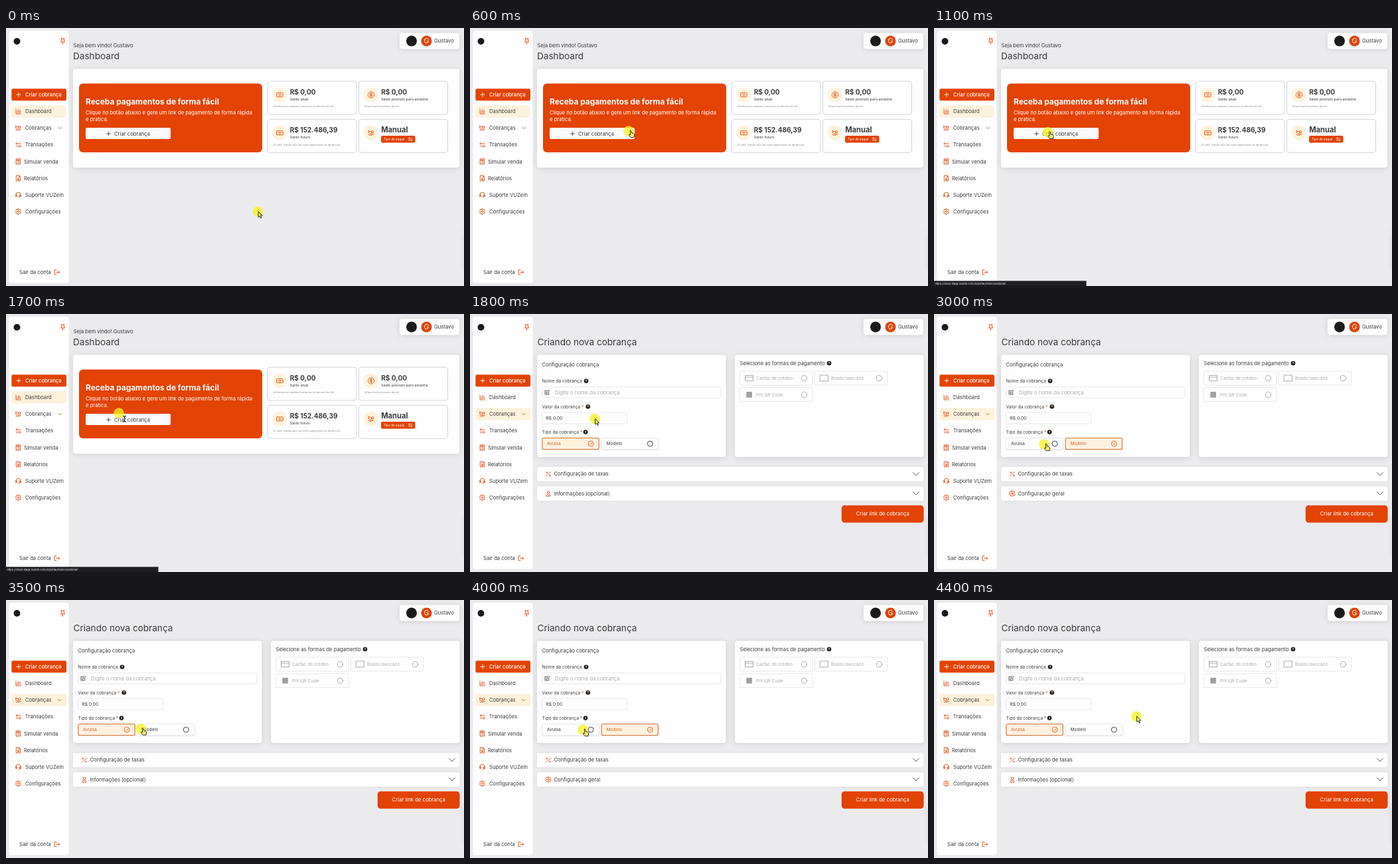
Animation, 690 px wide and 388 px high, one loop 4900 ms. Source, as an HTML page:

```html
<!DOCTYPE html>
<html lang="pt-BR">
<head>
<meta charset="utf-8">
<title>Dashboard</title>
<style>
  html, body { margin: 0; width: 100%; height: 100%; overflow: hidden; background: #ebebed; }
  svg { display: block; width: 100%; height: 100%; font: 7.7px Inter, "Open Sans", sans-serif; }
  text { fill: #3c3c3e; }
  .icon { fill: none; stroke: #e04a10; stroke-width: .9; stroke-linecap: round; stroke-linejoin: round; }
  .dark { stroke: #444; }
  .light { stroke: #fff; }
  .grey { stroke: #a0a0a0; }
  .panel { fill: #fefefe; filter: drop-shadow(0 1px 4px #0000001c); }
  .row { fill: #fefefe; filter: drop-shadow(0 0 2px #0000000d); }
  .orange { fill: #e34304; }
  .cream { fill: #fdf2da; }
  .white { fill: #fff; }
  .muted { fill: #adadad; }
  .title { font-size: 13.6px; }
  .label { font-size: 6.7px; }
  .small { font-size: 5.35px; }
  .tiny { font-size: 3.65px; fill: #888; }
  .bold { font-weight: 700; font-size: 10.1px; }
  .box { fill: #fefefe; stroke: #cfd0d8; stroke-width: .9; }
  .field { fill: #fefefe; stroke: #e2e2e4; stroke-width: .8; }
  .option rect { fill: #fefefe; stroke: #e6e6e8; stroke-width: .7; filter: drop-shadow(0 1px 1px #0000001c); }
  .option circle { fill: none; stroke: #333; stroke-width: .9; }
  .option path { display: none; }
  .option.on rect { fill: #fdf2de; stroke: #d2703a; stroke-width: 1.1; filter: none; }
  .option.on text { fill: #d9642c; }
  .option.on circle, .option.on path { stroke: #d9642c; }
  .option.on path { display: inline; }
  .cursor { fill: #f5f07a; stroke: #222; stroke-width: .9; stroke-linejoin: round; }
</style>
</head>
<body>
<svg viewBox="0 0 690 388" preserveAspectRatio="none">
  <defs>
    <path id="plus" d="M-3 0H3M0-3V3"/>
    <path id="chart" d="M-3.5-3.5V3.5H3.7M-1.4 1.8V-.8M.7 1.8V-3M2.8 1.8V-1.6"/>
    <path id="coins" d="M-4-3.4L-1.6-2.6 1.4-.4M-4-.8L-1.4 1.4H1.4M-3.8 2.6L0 3.4 4 1.6M3.6-1.6a1.6 1.6 0 1 1-3.2 0a1.6 1.6 0 1 1 3.2 0M-3.6-3.2V-.8"/>
    <path id="swap" d="M3.6-1.8H-3.4l1.6-1.6M-3.4-1.8l1.6 1.6M-3.4 2H3.6L2 .4M3.6 2L2 3.6"/>
    <path id="calculator" d="M-3-4H3V4H-3ZM-1.6-2.5H1.6V-1.2H-1.6ZM-1.5.6h.1M0 .6h.1M1.5.6h.1M-1.5 2.4h.1M0 2.4h.1M1.5 2.4h.1"/>
    <path id="file" d="M-2.8-4H1L3-2V4H-2.8ZM1-4V-2H3M-1 2.4V.6M.2 2.4V-.6M1.4 2.4V1"/>
    <path id="headset" d="M-3.5 1V-.4A3.5 3.5 0 0 1 3.5-.4V1.5Q3.5 3.5 .5 3.5M-3.5 0H-2V2.4H-3.5ZM3.5 0H2V2.4H3.5Z"/>
    <g id="gear"><path d="M-.8-4H.8L1.2-2.8 2.7-3.2 3.9-1.3 3 0 3.9 1.3 2.7 3.2 1.2 2.8 .8 4H-.8L-1.2 2.8-2.7 3.2-3.9 1.3-3 0-3.9-1.3-2.7-3.2-1.2-2.8Z"/><circle r="1.3"/></g>
    <path id="exit" d="M-.5-3.5H-3.5V3.5H-.5M-1 0H4M2.2-2L4 0 2.2 2"/>
    <path id="pin" d="M-2.5-4H2.5M-1.8-4V-1L-3.3 1H3.3L1.8-1V-4M0 1V4.5"/>
    <g id="bill"><rect x="-4.8" y="-3" width="9.6" height="6" rx=".7"/><circle r="1.2"/><path d="M-3.2 0h.2M3.2 0h-.2"/></g>
    <g id="dollar"><circle r="4.6"/><path d="M1.5-1.5Q0-2.6-1.2-1.6T0 0 1.2 1.6-1.5 1.5M0-3V3"/></g>
    <path id="edit" d="M0-2.8H-3V3H2.8V.5M-1 1L-.6-.8 2.6-3.8 3.9-2.5.8.6Z"/>
    <path id="person" d="M1.7-1.8a1.7 1.7 0 1 1-3.4 0a1.7 1.7 0 1 1 3.4 0M-3 3.6Q-3 1 0 1T3 3.6Z"/>
    <path id="percent" d="M-3 3L3-3M-1.3-2.2a.9.9 0 1 1-1.8 0a.9.9 0 1 1 1.8 0M3.1 2.2a.9.9 0 1 1-1.8 0a.9.9 0 1 1 1.8 0"/>
    <path id="chevron" d="M-4.5-2.2L0 2.2 4.5-2.2"/>
    <g id="help"><circle r="3.3" fill="#1a1a1a"/><text y="1.9" text-anchor="middle" style="font:700 5.2px Inter,sans-serif;fill:#fff">?</text></g>
  </defs>

  <rect width="690" height="388" fill="#ebebed"/>
  <rect class="panel" x="691" y="306" width="20" height="58"/>

  <!-- Sidebar -->
  <rect x="4.5" y="4" width="90" height="379.5" rx="4" fill="#fefefe"/>
  <circle cx="16.5" cy="20" r="5" fill="#1c1a1a"/>
  <use href="#pin" class="icon" x="85.5" y="20"/>
  <rect class="orange" x="8.3" y="91.3" width="82.7" height="17.9" rx="2.5"/>
  <use href="#plus" class="icon light" x="19" y="100.2"/>
  <text class="white" x="29" y="102.8" style="font-weight:500">Criar cobrança</text>
  <rect id="active" class="cream" x="8.3" width="82.7" height="18" rx="2.5"/>
  <g id="menu"></g>
  <path class="icon" d="M78.7 149.4L81 151.7 83.3 149.4"/>
  <text x="20" y="370">Sair da conta</text>
  <use href="#exit" class="icon" x="76.5" y="367.3"/>

  <!-- Account -->
  <rect class="panel" x="593" y="7.5" width="90" height="24" rx="4"/>
  <circle cx="611" cy="19.5" r="8" fill="#1c1a1a"/>
  <circle class="orange" cx="633.5" cy="19.5" r="8"/>
  <text class="white" x="633.5" y="23.3" text-anchor="middle" style="font-size:10.5px">G</text>
  <text x="645" y="22.2">Gustavo</text>

  <g id="dashboard">
    <text x="101.5" y="29">Seja bem vindo! Gustavo</text>
    <text class="title" x="101" y="47.2">Dashboard</text>
    <rect class="panel" x="101" y="61.5" width="582" height="148.5" rx="4"/>
    <rect class="orange" x="110" y="83.5" width="276" height="103.5" rx="6"/>
    <text class="white bold" x="120" y="115" style="font-size:11.9px">Receba pagamentos de forma fácil</text>
    <text class="white" x="120" y="129.7">Clique no botão abaixo e gere um link de pagamento de forma rápida</text>
    <text class="white" x="120" y="140.4">e pratica.</text>
    <rect x="120" y="150" width="128" height="17" rx="2" fill="#fbfbfb"/>
    <use href="#plus" class="icon dark" x="154.5" y="159"/>
    <text x="163" y="161.5">Criar cobrança</text>
    <g id="cards"></g>
    <rect class="orange" x="565" y="162" width="51.5" height="10.5" rx="2"/>
    <text class="white" x="569" y="169" style="font-size:4.7px">Tipo de saque</text>
    <use href="#swap" class="icon light" transform="translate(609 167.2) scale(.75)"/>
  </g>

  <g id="form">
    <text class="title" x="101.5" y="47.2">Criando nova cobrança</text>
    <rect class="panel" x="101" y="61.5" width="284.5" height="153.5" rx="4"/>
    <rect class="panel" x="399" y="61.5" width="284.5" height="153.5" rx="4"/>
    <text x="108.5" y="79.3">Configuração cobrança</text>
    <text class="label" x="108.5" y="103.3">Nome da cobrança</text>
    <use href="#help" x="175" y="100.8"/>
    <rect class="field" x="108.5" y="109.7" width="269.5" height="16.3" rx="2"/>
    <use href="#edit" class="icon dark" x="116" y="118"/>
    <text class="muted" x="128" y="120.6">Digite o nome da cobrança</text>
    <text class="label" x="108.5" y="141.8">Valor da cobrança <tspan class="orange">*</tspan></text>
    <use href="#help" x="177.7" y="139.3"/>
    <rect class="field" x="108.5" y="148" width="128" height="17" rx="2"/>
    <text class="label" x="114.5" y="159">R$ 0.00</text>
    <text class="label" x="108.5" y="180.1">Tipo da cobrança <tspan class="orange">*</tspan></text>
    <use href="#help" x="174" y="177.6"/>
    <g id="single" class="option">
      <rect x="108.8" y="186.5" width="85.4" height="17" rx="2"/>
      <text class="label" x="116" y="197.3">Avulsa</text>
      <circle cx="182" cy="195" r="4"/><path class="icon" d="M180.2 195L181.6 196.5 184 193.7"/>
    </g>
    <g id="model" class="option">
      <rect x="198.2" y="186.5" width="85.2" height="17" rx="2"/>
      <text class="label" x="205.5" y="197.3">Modelo</text>
      <circle cx="271.3" cy="195" r="4"/><path class="icon" d="M269.5 195L270.9 196.5 273.3 193.7"/>
    </g>

    <text x="406.5" y="76.7">Selecione as formas de pagamento</text>
    <use href="#help" x="541" y="74"/>
    <g id="methods"></g>
    <path class="icon grey" d="M415 92.3H426.5V100.8H415ZM415 95H426.5"/>
    <rect class="icon grey" x="527.5" y="92" width="12" height="9"/>
    <rect x="416.3" y="117" width="8.6" height="8.6" fill="#a0a0a0"/>

    <rect class="row" x="101" y="230" width="582.5" height="21.5" rx="3"/>
    <rect class="row" x="101" y="259.2" width="582.5" height="21.5" rx="3"/>
    <use href="#percent" class="icon" x="118" y="240.7"/>
    <text x="126.5" y="243.4">Configuração de taxas</text>
    <g id="singleRow">
      <use href="#person" class="icon" x="118" y="270"/>
      <text x="126.5" y="272.6">Informações (opcional)</text>
    </g>
    <g id="modelRow">
      <use href="#gear" class="icon" x="118" y="270"/>
      <text x="126.5" y="272.6">Configuração geral</text>
    </g>
    <use href="#chevron" class="icon dark" x="672" y="240.5"/>
    <use href="#chevron" class="icon dark" x="672" y="269.7"/>
    <rect class="orange" x="559.8" y="287.7" width="123.7" height="26" rx="4.5"/>
    <text class="white" x="581.7" y="303.4">Criar link de cobrança</text>
  </g>

  <g id="status">
    <rect y="380.3" width="229.5" height="7.7" fill="#1f1f23"/>
    <text class="tiny" x="1.5" y="385.5" style="font-size:3.9px;fill:#eee">https://cloud-stage.vuzem.com.br/portal/invoice/edit/new</text>
  </g>

  <g id="pointer">
    <circle r="7.8" fill="#f6f31e" opacity=".75"/>
    <path id="arrow" class="cursor" d="M.5 0V8.5L2.5 6.8 4 10 5.5 9.3 4.1 6.2H6.8Z"/>
    <path id="hand" class="cursor" d="M2.2-.8Q3.2-1.6 3.8-.3L4.6 3 7.6 3.6Q8.8 4 8.6 5.5L8 9.6H3.2L.2 5.8Q.4 4.5 2.8 5.6Z"/>
    <path id="beam" d="M6 4.5Q8.5 4.5 8.5 6V11.5Q8.5 13 6 13M11 4.5Q8.5 4.5 8.5 6M8.5 11.5Q8.5 13 11 13" fill="none" stroke="#151515" stroke-width="1.2"/>
  </g>
</svg>

<script>
const $ = id => document.getElementById(id);
const show = (id, visible) => { $(id).style.display = visible ? "" : "none"; };

$("menu").innerHTML = [
  ["chart", "Dashboard", 29], ["coins", "Cobranças", 29], ["swap", "Transações", 29],
  ["calculator", "Simular venda", 27], ["file", "Relatórios", 27],
  ["headset", "Suporte VUZem", 29], ["gear", "Configurações", 29],
].map(([icon, label, x], i) => {
  const y = 125.5 + i * 25.1;
  return `<use href="#${icon}" class="icon" x="18.5" y="${y}"/><text x="${x}" y="${y + 2.7}">${label}</text>`;
}).join("");

$("cards").innerHTML = [
  [394, 80, "bill", "R$ 0,00", "Saldo atual", "*Informações sujeitas a variações no decorrer do dia"],
  [531.5, 80, "dollar", "R$ 0,00", "Saldo previsto para amanhã", "*Disponível no próximo dia útil"],
  [394, 137.3, "bill", "R$ 152.486,39", "Saldo futuro", "*O valor exibido aqui não inclui pagamentos do dia de hoje"],
  [531.5, 137.3, "coins", "Manual", "", ""],
].map(([x, y, icon, value, label, note]) => `<g transform="translate(${x} ${y})">
  <rect class="box" width="134" height="50" rx="4"/>
  <circle class="cream" cx="18.5" cy="20.5" r="11"/>
  <use href="#${icon}" class="icon" x="18.5" y="20.5"/>
  <text class="bold" x="33.7" y="19.7" ${label ? "" : 'style="font-size:11.2px"'}>${value}</text>
  <text class="small" x="33.7" y="29.2">${label}</text>
  <text class="tiny" x="8" y="39.3">${note}</text></g>`).join("");

$("methods").innerHTML = [
  [406.5, 86, "Cartão de crédito"], [519.5, 86, "Boleto bancário"], [406.5, 110.7, "PIX QR Code"],
].map(([x, y, label]) => `<rect class="field" x="${x}" y="${y}" width="109.5" height="21" rx="2"/>
  <text class="label muted" x="${x + 24.5}" y="${y + 13}">${label}</text>
  <circle class="icon grey" cx="${x + 97}" cy="${y + 10.6}" r="4.1"/>`).join("");

const LOOP = 4900, STEP = 100;
// Pointer stops: time, x, y
const path = [
  [0, 379.5, 276], [600, 239, 155], [1200, 166, 157], [1400, 166, 157], [1700, 170, 149],
  [2100, 285, 203.5], [2300, 285, 203.5], [2500, 251, 198], [2700, 251, 198], [3000, 166, 196],
  [3300, 180, 196], [3400, 180, 196], [3500, 203, 193.5], [3700, 235, 195], [4000, 170, 195],
  [4100, 170, 195], [4400, 305, 175], [LOOP, 305, 175],
];

function pointerAt(time) {
  const i = path.findIndex(stop => stop[0] > time);
  const [t0, x0, y0] = path[i - 1], [t1, x1, y1] = path[i];
  const p = (time - t0) / (t1 - t0), ease = p * p * (3 - 2 * p);
  return [x0 + (x1 - x0) * ease, y0 + (y1 - y0) * ease];
}

function cursorAt(time) {
  if (time >= 1600 && time < 1800) return "beam";
  return (time >= 600 && time < 1600) || (time >= 2500 && time < 4300) ? "hand" : "arrow";
}

function draw(now) {
  const time = Math.floor(now % LOOP / STEP) * STEP;
  const onForm = time >= 1800;
  const onModel = (time >= 2800 && time < 3200) || (time >= 3700 && time < 4100);
  show("dashboard", !onForm);
  show("form", onForm);
  show("status", time >= 800 && !onForm);
  $("active").setAttribute("y", onForm ? 141.6 : 116.5);
  $("single").classList.toggle("on", !onModel);
  $("model").classList.toggle("on", onModel);
  show("singleRow", !onModel);
  show("modelRow", onModel);
  const cursor = cursorAt(time);
  for (const id of ["arrow", "hand", "beam"]) show(id, id === cursor);
  $("pointer").setAttribute("transform", `translate(${pointerAt(time)})`);
}

const start = performance.now();
function tick() {
  draw(performance.now() - start);
  requestAnimationFrame(tick);
}
tick();
</script>
</body>
</html>
```
